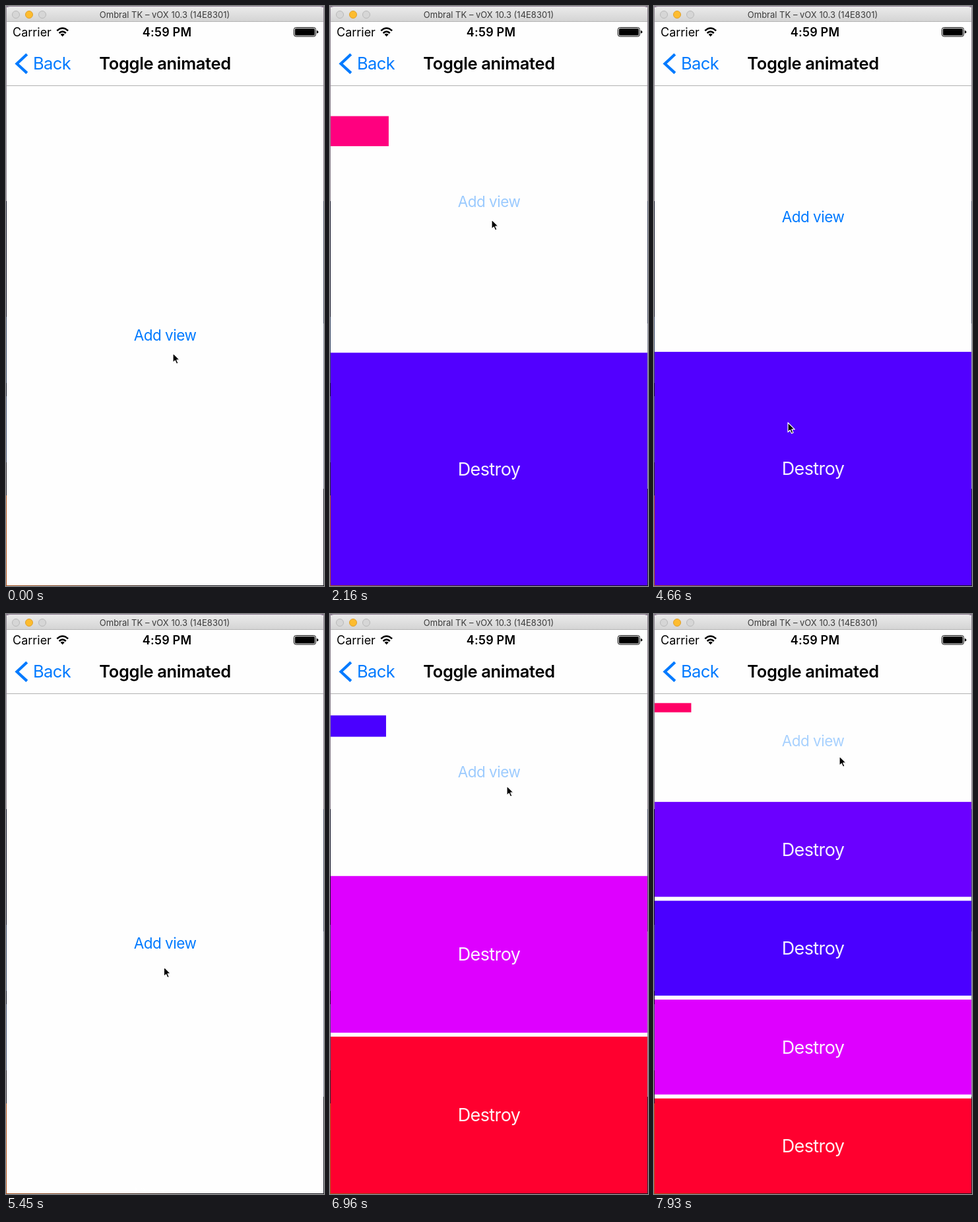
An HTML page that plays this animation: 482 px wide and 877 px high, repeating every 8 s.

```html
<!DOCTYPE html>
<html lang="en">
<head>
<meta charset="utf-8">
<title>Toggle animated</title>
<style>
  html, body { margin: 0; width: 100%; height: 100%; overflow: hidden; }
  body { position: relative; background: #fefefe; font-family: Inter, Roboto, sans-serif; }
  svg { position: absolute; left: 0; top: 0; }
  #add { fill: #007aff; font-size: 22.5px; letter-spacing: -.5px; text-anchor: middle; }
  #stack text { fill: #fff; font-size: 27px; letter-spacing: -.6px; text-anchor: middle; }
  .edge { position: absolute; top: 0; width: 1px; height: 877px; }
  #left {
    left: 0;
    background: linear-gradient(#8d8390 0 295px, #14162a 295px 470px, #3b4a68 470px 570px,
      #161a2c 570px 590px, #465574 590px 690px, #2a2730 690px 740px, #b4541c 740px 877px);
  }
  #right {
    left: 481px;
    background: linear-gradient(#8d8390 0 295px, #555b70 295px 480px, #8d92a2 480px 730px, #2b2c38 730px);
  }
  #foot {
    position: absolute; left: 0; top: 876px; width: 482px; height: 1px;
    background: linear-gradient(90deg, #a4501c, #4a2c1e 35%, #16161c 60%);
  }
</style>
</head>
<body>
<svg width="482" height="877" viewBox="0 0 482 877">
  <defs>
    <linearGradient id="bar" x1="0" y1="0" x2="0" y2="1">
      <stop offset="0" stop-color="#ebebeb"/><stop offset="1" stop-color="#d3d3d3"/>
    </linearGradient>
  </defs>
  <text id="add" x="241">Add view</text>
  <g id="stack"></g>

  <rect width="482" height="2" fill="#8d7c92"/>
  <path d="M1 24V6Q1 1 6 1H476Q481 1 481 6V24Z" fill="url(#bar)"/>
  <rect x="1" y="23" width="480" height="1" fill="#b4b4b4"/>
  <g fill="#d6d6d6" stroke="#b9b9b9">
    <circle cx="15" cy="13" r="5.5"/>
    <circle cx="35" cy="13" r="5.5" fill="#fdbc2f" stroke="#dfa02c"/>
    <circle cx="55" cy="13" r="5.5"/>
  </g>
  <text x="240.5" y="18" font-size="13" text-anchor="middle" fill="#3c3c3c">Ombral TK – vOX 10.3 (14E8301)</text>

  <text x="10" y="46" font-size="18">Carrier</text>
  <text x="244" y="46" font-size="18" font-weight="600" letter-spacing=".2" text-anchor="middle">4:59 PM</text>
  <g fill="none" stroke="#000" stroke-width="2.6">
    <path d="M77.3 37.4Q85.7 29.6 94.1 37.4"/>
    <path d="M80.6 41Q85.7 36.2 90.8 41"/>
  </g>
  <path d="M85.7 46.3L82.6 43Q85.7 40.3 88.8 43Z"/>
  <rect x="436.5" y="32.5" width="33" height="13.5" rx="3" fill="none" stroke="#000"/>
  <rect x="438" y="34" width="30" height="10.5" rx="1.5"/>
  <path d="M471 37Q473.5 37.5 473.5 39.3T471 41.6Z"/>

  <path d="M31.8 73L16.5 87.2L31.8 101.4" fill="none" stroke="#007aff" stroke-width="4.2"/>
  <text x="41" y="96" font-size="25.5" letter-spacing="-.6" fill="#007aff">Back</text>
  <text x="241" y="96" font-size="25.5" font-weight="600" letter-spacing="-.35" text-anchor="middle">Toggle animated</text>
  <rect x="1" y="120" width="480" height="1" fill="#b2b2b2"/>

  <path id="cursor" d="M0 0V14.2L3.3 11.2L5.5 16.2L8 15.1L5.8 10.2H10.2Z"
    stroke="#fff" stroke-width="1.2" stroke-linejoin="round"/>
</svg>
<div class="edge" id="left"></div>
<div class="edge" id="right"></div>
<div id="foot"></div>

<script>
const LOOP = 8000, DURATION = 300, TOP = 120, BOTTOM = 876, WIDTH = 480, GAP = 6;
const LEFT = 1, CENTER = 241;

// The screen refreshes at these times: [first, last, count].
const bursts = [
  [0, 0, 1], [150, 940, 7], [1210, 2160, 8], [2310, 3000, 6], [3590, 4130, 5], [4660, 5600, 8],
  [5720, 6000, 3], [6150, 6690, 5], [6840, 6960, 2], [7110, 7810, 6], [7930, 7930, 1]
];
const ticks = bursts.flatMap(([a, b, n]) =>
  Array.from({ length: n }, (_, i) => Math.round(a + (b - a) * i / Math.max(1, n - 1))));

const colors = ['#5200ff', '#ff007f', '#ff002f', '#de00ff', '#4a00ff', '#6b00ff', '#ff0066'];

// Block `id` is inserted on top of the stack, or destroyed.
const events = [
  { t: 231, id: 0, add: true },
  { t: 2071, id: 1, add: true },
  { t: 3469, id: 1 },
  { t: 4609, id: 0 },
  { t: 5670, id: 2, add: true },
  { t: 6330, id: 3, add: true },
  { t: 6873, id: 4, add: true },
  { t: 7285, id: 5, add: true },
  { t: 7859, id: 6, add: true }
];

// Cursor tip: [time, x, y]
const path = [
  [0, 253, 525], [400, 253, 525], [940, 250, 430], [1200, 250, 430], [2030, 245, 323],
  [2250, 245, 323], [3000, 208, 493], [3590, 208, 493], [4130, 203, 630], [4700, 203, 630],
  [5500, 243, 524], [5720, 243, 524], [6000, 241, 429], [6285, 254, 325], [6420, 255, 322],
  [6840, 268, 260], [6960, 268, 260], [7250, 275, 228], [7390, 275, 228], [7810, 281, 215], [8000, 281, 215]
];

const add = document.getElementById('add');
const cursor = document.getElementById('cursor');

function make(tag, attrs, parent) {
  const el = document.createElementNS('http://www.w3.org/2000/svg', tag);
  setAttrs(el, attrs);
  parent.append(el);
  return el;
}

function setAttrs(el, attrs) {
  for (const key in attrs) el.setAttribute(key, attrs[key]);
}

const blocks = colors.map(fill => {
  const group = make('g', {}, document.getElementById('stack'));
  const rect = make('rect', { x: LEFT, fill }, group);
  const label = make('text', {}, group);
  label.textContent = 'Destroy';
  return { group, rect, label };
});

const clamp = v => Math.min(1, Math.max(0, v));
const mix = (a, b, p) => a + (b - a) * p;

// cubic-bezier(.42, 0, .58, 1)
function ease(x) {
  let lo = 0, hi = 1;
  for (let i = 0; i < 24; i++) {
    const s = (lo + hi) / 2, r = 1 - s;
    if (3 * r * r * s * .42 + 3 * r * s * s * .58 + s * s * s < x) lo = s; else hi = s;
  }
  return lo * lo * (3 - 2 * lo);
}

function slot(i, count) {
  const pitch = (BOTTOM - TOP + GAP) / (count + 1);
  return { y: TOP + i * pitch, w: WIDTH, h: pitch - GAP };
}

const between = (a, b, p) => ({ y: mix(a.y, b.y, p), w: mix(a.w, b.w, p), h: mix(a.h, b.h, p) });

// Baseline that centres capitals of the given font size in a box.
const baseline = (box, size) => box.y + box.h / 2 + size * .364;

function drawStack(t) {
  let before = [], after = [], last = null;
  for (const e of events) {
    if (e.t > t) break;
    before = after;
    after = e.add ? [e.id, ...before] : before.filter(id => id !== e.id);
    last = e;
  }
  const p = last ? ease(clamp((t - last.t) / DURATION)) : 1;
  const n = before.length, m = after.length;

  add.setAttribute('y', baseline(between(slot(0, n), slot(0, m), p), 22.5));
  blocks.forEach(({ group, rect, label }, id) => {
    const i = before.indexOf(id), j = after.indexOf(id);
    const gone = j < 0 && (i < 0 || p >= 1);
    group.style.display = gone ? 'none' : '';
    if (gone) return;
    const from = i < 0 ? { y: TOP, w: 0, h: 0 } : slot(i + 1, n);
    const to = j < 0
      ? { y: Math.min(BOTTOM, slot(i + 1, m).y - GAP / 2), w: WIDTH, h: 0 }
      : slot(j + 1, m);
    const box = between(from, to, p);
    setAttrs(rect, { y: box.y, width: box.w, height: box.h });
    setAttrs(label, {
      x: LEFT + box.w / 2 + CENTER - LEFT - WIDTH / 2,
      y: baseline(box, 27),
      opacity: i < 0 ? .95 * clamp((p - .25) / .5) : .95
    });
  });

  // The button dims on press and recovers while the new block grows.
  const press = events.find(e => e.add && t >= e.t - 80 && t < e.t + DURATION);
  add.style.opacity = press ? mix(.25, 1, ease(clamp((t - press.t) / DURATION))) : 1;
}

function drawCursor(t) {
  const k = Math.max(1, path.findIndex(q => q[0] >= t));
  const [t0, x0, y0] = path[k - 1], [t1, x1, y1] = path[k];
  const p = ease(clamp((t - t0) / (t1 - t0)));
  cursor.setAttribute('transform', `translate(${mix(x0, x1, p)} ${mix(y0, y1, p)})`);
}

const start = performance.now();
function frame() {
  const now = (performance.now() - start) % LOOP;
  const t = ticks.filter(v => v <= now).pop() || 0;
  drawStack(t);
  drawCursor(t);
  requestAnimationFrame(frame);
}
frame();
</script>
</body>
</html>
```
